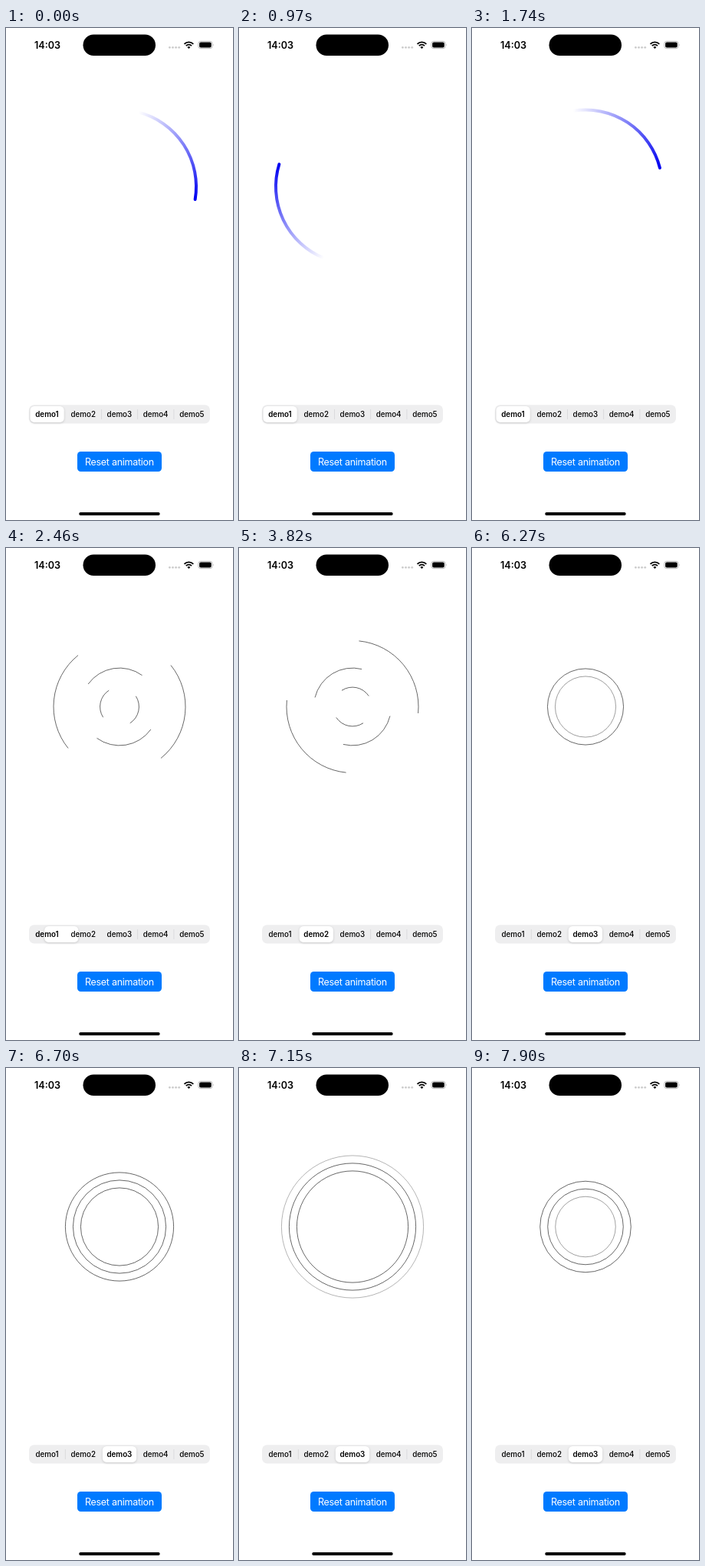
Write an HTML page with a canvas that moves like this. It is 296 by 640 pixels and loops after 8 s.

```html
<!DOCTYPE html>
<html lang="en">
<head>
<meta charset="utf-8">
<title>Animation demos</title>
<style>
  html, body { margin: 0; width: 100%; height: 100%; overflow: hidden; background: #fff; }
  svg, canvas { position: absolute; left: 0; top: 0; width: 296px; height: 640px; }
  text { font-family: Inter, "Liberation Sans", sans-serif; text-anchor: middle; }
  .label { font-size: 9.8px; font-weight: 500; }
  .label.on { font-weight: 600; }
  #pill { filter: drop-shadow(0 1px 1.5px rgba(0, 0, 0, .16)); }
</style>
</head>
<body>
<svg viewBox="0 0 296 640">
  <!-- status bar -->
  <text x="54" y="26.6" font-size="12.6" font-weight="600">14:03</text>
  <rect x="100.5" y="8.5" width="94.5" height="27.5" rx="13.75"/>
  <g fill="#ccc">
    <circle cx="213.4" cy="25.3" r="1.4"/><circle cx="217.5" cy="25.3" r="1.4"/>
    <circle cx="221.6" cy="25.3" r="1.4"/><circle cx="225.7" cy="25.3" r="1.4"/>
  </g>
  <g fill="none" stroke="#000" stroke-width="1.9">
    <path d="M232.5 20.8A8.3 8.3 0 0 1 244.3 20.8"/>
    <path d="M234.8 23.2A5 5 0 0 1 242 23.2"/>
  </g>
  <path d="M238.4 27L236.4 25A2.8 2.8 0 0 1 240.4 25Z"/>
  <rect x="250.8" y="17.3" width="18.2" height="9.4" rx="3" fill="none" stroke="#aaa" stroke-width=".8"/>
  <rect x="252.1" y="18.6" width="15.6" height="6.8" rx="1.9"/>
  <path d="M269.9 20.5Q271.2 22 269.9 23.5Z" fill="#aaa"/>

  <!-- segmented control -->
  <rect x="30" y="490.3" width="236" height="24.2" rx="6.7" fill="#eeeeef"/>
  <g id="lines" fill="#d6d6d9"></g>
  <rect id="pill" x="31.5" y="491.9" width="44.2" height="21" rx="5.3" fill="#fff"/>
  <g id="labels"></g>

  <!-- button and home indicator -->
  <rect x="93" y="551" width="110" height="26" rx="4.5" fill="#007aff"/>
  <text x="147.9" y="568.6" font-size="12.5" letter-spacing="-.27" fill="#fff">Reset animation</text>
  <rect x="95.2" y="630" width="105.5" height="4" rx="2"/>
</svg>
<canvas></canvas>
<script>
const LOOP = 8000, CX = 148, CY = 206.5, SEG = 47.2;
const RAD = Math.PI / 180, TAU = 2 * Math.PI;
const STARTS = [0, 2399, 5871];   // when each demo begins
const PILL_LEAD = 8;              // the pill starts just before the content

const pill = document.getElementById('pill');
const canvas = document.querySelector('canvas');
const ctx = canvas.getContext('2d');
const dpr = window.devicePixelRatio || 1;
canvas.width = 296 * dpr;
canvas.height = 640 * dpr;
ctx.scale(dpr, dpr);

function add(parent, tag, attrs, text = '') {
  const el = document.createElementNS('http://www.w3.org/2000/svg', tag);
  for (const k in attrs) el.setAttribute(k, attrs[k]);
  el.textContent = text;
  return document.getElementById(parent).appendChild(el);
}
const labels = [0, 1, 2, 3, 4].map(i =>
  add('labels', 'text', { x: 53.5 + SEG * i, y: 506, class: 'label' }, 'demo' + (i + 1)));
const lines = [1, 2, 3, 4].map(i =>
  add('lines', 'rect', { x: 29.7 + SEG * i, y: 496, width: .8, height: 13 }));

function stroke(r, from, to) {
  ctx.beginPath();
  ctx.arc(CX, CY, r, from, to);
  ctx.stroke();
}

function comet(ms) {
  const span = 85 * RAD;
  const head = (9.3 + .1933 * ms) * RAD;
  const fade = ctx.createConicGradient(head - span, CX, CY);
  fade.addColorStop(0, 'rgba(0,0,240,0)');
  fade.addColorStop(span / TAU, 'rgb(0,0,240)');
  fade.addColorStop(.5, 'rgb(0,0,240)');
  fade.addColorStop(.5, 'rgba(0,0,240,0)');
  ctx.strokeStyle = fade;
  ctx.lineWidth = 4;
  ctx.lineCap = 'round';
  stroke(100, head - span, head);
}

function thinLine() {
  ctx.strokeStyle = '#000';
  ctx.lineWidth = .6;
  ctx.lineCap = 'butt';
}

// Pairs of quarter arcs: radius, start angle, degrees per ms
const ARCS = [[86, 0, .0989], [50.4, 90, -.1485], [25.4, 0, .198]];
function orbits(ms) {
  thinLine();
  for (const [r, start, speed] of ARCS)
    for (const side of [0, 180]) {
      const mid = start + side + speed * ms;
      stroke(r, (mid - 45) * RAD, (mid + 45) * RAD);
    }
}

// Three rings grow from 30 to 100, each 10 behind the last
function ripples(ms) {
  thinLine();
  for (let i = 0; i < 3; i++) {
    const grown = .0489 * ms - 10 * i;
    if (grown < 0) continue;
    const d = grown % 70;
    ctx.globalAlpha = Math.min(1, d / 15, (70 - d) / 15);
    stroke(30 + d, 0, TAU);
  }
  ctx.globalAlpha = 1;
}

const DEMOS = [comet, orbits, ripples];
const active = t => STARTS.filter(s => t >= s).length - 1;

function render(t) {
  const demo = active(t);
  ctx.clearRect(0, 0, 296, 640);
  DEMOS[demo](t - STARTS[demo]);

  const tab = active(t + PILL_LEAD);
  let x = tab;
  if (tab) {
    const s = (t + PILL_LEAD - STARTS[tab]) * .0195;
    x -= (1 + s) * Math.exp(-s);
  }
  pill.setAttribute('transform', `translate(${SEG * x})`);

  const bold = active(Math.max(0, t - 100));
  labels.forEach((el, i) => el.classList.toggle('on', i === bold));
  lines.forEach((el, i) => el.setAttribute('opacity', i === tab || i === tab - 1 ? 0 : 1));
}

const began = performance.now();
function tick() {
  render((performance.now() - began) % LOOP);
  requestAnimationFrame(tick);
}
tick();
</script>
</body>
</html>
```
